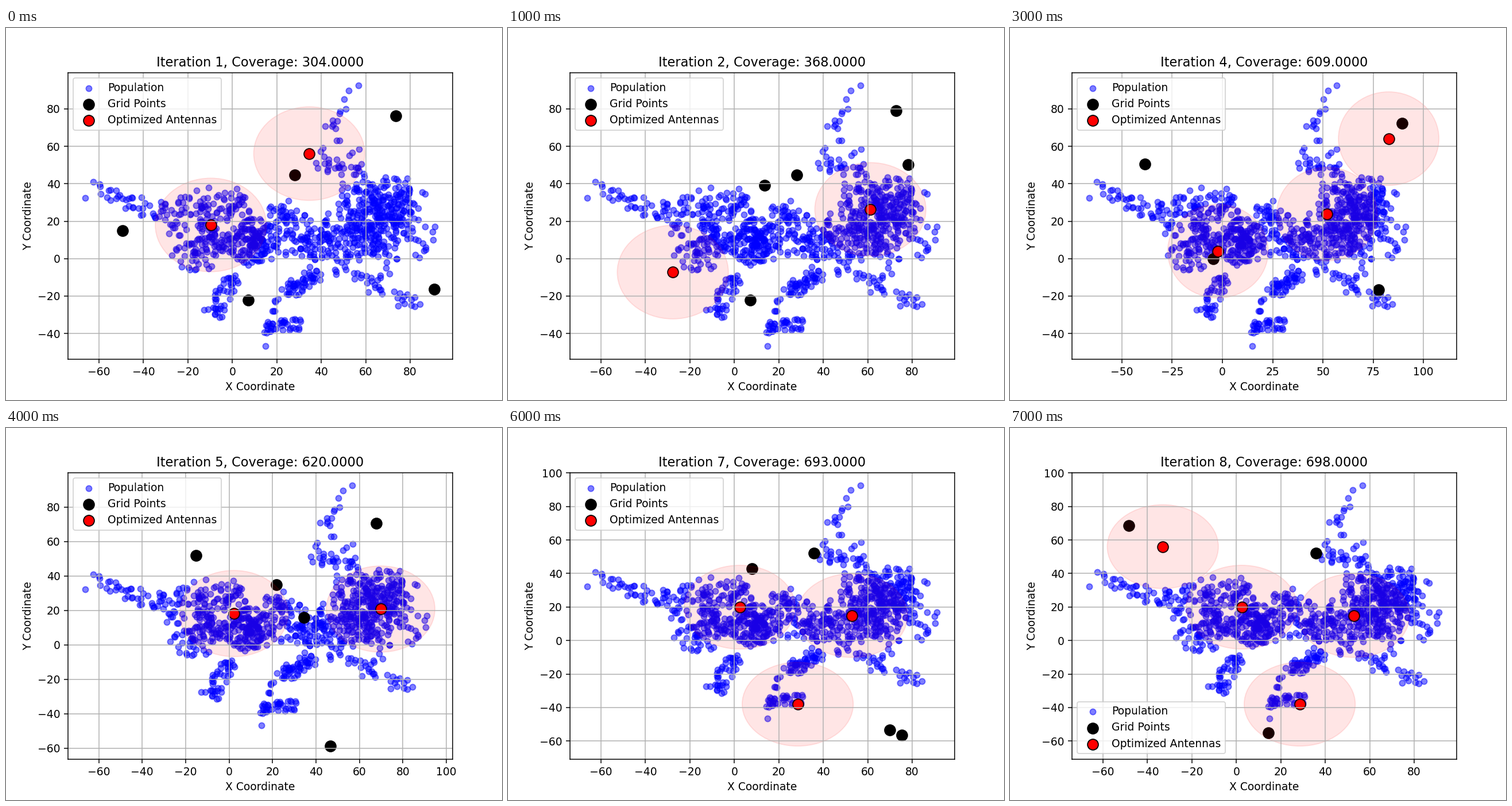
These frames come from a looping animation (864 by 648 pixels, 8000 ms). A matplotlib script:

```python
import numpy as np
import matplotlib.pyplot as plt
from matplotlib.animation import FuncAnimation
from matplotlib.patches import Circle

RADIUS = 25
rng = np.random.default_rng(7)


def blob(x, y, spread, count):
    """Round, bounded settlement that is densest at its centre."""
    angle = rng.uniform(0, 2 * np.pi, count)
    r = 2.3 * spread * rng.random(count) ** 0.7
    return np.column_stack([x + r * np.cos(angle), y + r * np.sin(angle)])


def trail(start, end, spread, count):
    """People strung out along a road."""
    t = rng.random((count, 1))
    road = np.array(start) * (1 - t) + np.array(end) * t
    return road + rng.uniform(-spread, spread, (count, 2))


people = np.vstack([
    # west
    trail((-61, 38), (-34, 24), 4, 32),
    blob(-28, 26, 3.6, 24),
    blob(-13, 28, 4.6, 38),
    blob(2, 30, 3.6, 28),
    blob(-17, 7, 6, 66),
    blob(-4, 14, 5.5, 52),
    blob(10, 9, 5.5, 150),
    # middle
    blob(24, 22, 4, 32),
    blob(32, 11, 5.5, 54),
    blob(43, 3, 6.5, 60),
    # east
    blob(54, 17, 6, 58),
    blob(67, 25, 7.5, 165),
    blob(60, 36, 5, 28),
    blob(75, 33, 5.5, 42),
    blob(64, 3, 6, 46),
    blob(78, 11, 5.5, 38),
    # north and south
    trail((54, 89), (44, 69), 2.5, 11),
    blob(48, 53, 5, 30),
    trail((1, -8), (-9, -30), 4, 42),
    trail((38, -8), (24, -18), 4, 46),
    trail((19, -20), (19, -28), 2, 6),
    trail((14, -37), (30, -35), 3, 36),
    trail((56, -11), (83, -25), 3.5, 26),
    # outermost people, which set the axis limits
    [(-66.1, 32.4), (91.15, 17), (56.8, 92.4), (15, -46.7)],
])

# Grid points and antennas that stay for several iterations
north_east = [(72.8, 79), (78.2, 50.3), (13.7, 39.3)]
north = (35.9, 52.1)
south_east = [(69.9, -53.5), (75.4, -56.6)]
core = [(2.4, 19.9), (52.9, 14.9)]
south = (28.5, -38)

# Coverage, unused grid points, chosen antennas
STEPS = [
    (304, [(-49.3, 15), (28.1, 44.8), (73.6, 76.3), (90.9, -16.4),
           (7.1, -22.1)],
     [(-9.7, 18), (34.6, 56.1)]),
    (368, [*north_east, (28.1, 44.8), (7.1, -22.1)],
     [(-27.7, -7.2), (61.2, 26.3)]),
    (380, [*north_east, (17, -32.6), (-2.1, -58.7)],
     [(-8.9, -19.3), (61.2, 26.3)]),
    (609, [(89.4, 72.4), (-38.4, 50.6), (-4.5, 0), (77.7, -16.7)],
     [(82.7, 64.1), (52, 23.8), (-2.2, 4)]),
    (620, [(67.7, 70.6), (-15.3, 52), (21.7, 35), (34.5, 16),
           (46.6, -58.7)],
     [(2.2, 18.2), (69.8, 20.8)]),
    (631, [(7.8, 43), north, (11.7, -13.8), *south_east], core),
    (693, [(7.8, 43), north, *south_east], [*core, south]),
    (698, [(-48.5, 68.5), north, (14.4, -55)], [(-33.1, 56), *core, south]),
]

fig, ax = plt.subplots(figsize=(6.4, 4.8), dpi=135)


def draw(i):
    coverage, grid, antennas = STEPS[i]
    ax.clear()
    ax.scatter(*people.T, s=29, c="blue", alpha=0.5, label="Population")
    ax.scatter(*zip(*grid), s=100, c="black", label="Grid Points")
    ax.scatter(*zip(*antennas), s=100, c="red", edgecolors="black",
               label="Optimized Antennas")
    for spot in antennas:
        ax.add_patch(Circle(spot, RADIUS, color="red", alpha=0.1))
    ax.autoscale_view()
    ax.set_title(f"Iteration {i + 1}, Coverage: {coverage:.4f}")
    ax.set_xlabel("X Coordinate")
    ax.set_ylabel("Y Coordinate")
    ax.grid(True)
    ax.legend(loc="best")


anim = FuncAnimation(fig, draw, frames=len(STEPS), interval=1000, repeat=True)
plt.show()
```
